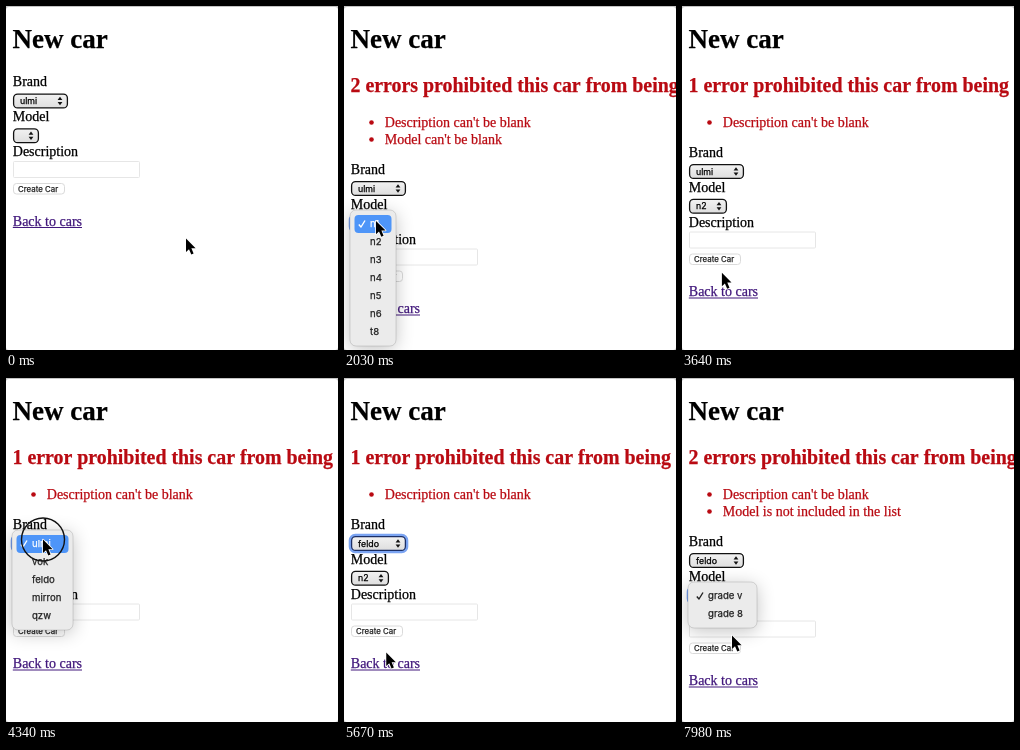
An HTML page with a canvas for the animation above (8000 ms loop, 332x344 px).

```html
<!DOCTYPE html>
<html lang="en">
<head>
<meta charset="utf-8">
<title>New car</title>
<style>
  html, body { margin: 0; width: 100%; height: 100%; overflow: hidden; background: #fff; }
  canvas { display: block; }
</style>
</head>
<body>
<canvas id="stage" width="332" height="344"></canvas>
<script>
const ctx = document.getElementById('stage').getContext('2d');
const LOOP = 8000, STEP = 70;
const SERIF = '"Liberation Serif", serif', SANS = 'Inter, sans-serif';
const RED = '#b90a12';

// Pointer tip: time, x, y
const path = [
  [0, 180, 232], [140, 191, 238], [630, 40, 183], [1330, 40, 183],
  [1610, 32, 212], [1960, 32, 212], [2310, 32, 234], [2520, 32, 234],
  [2870, 40, 303], [3080, 39.5, 260], [3220, 40, 269], [3570, 40, 270],
  [4200, 37, 161], [4480, 37, 161], [4760, 37, 208], [5110, 37, 208],
  [5600, 42, 276], [5950, 44.5, 257], [6580, 44.5, 257], [6860, 146, 136],
  [7140, 45, 216], [7630, 45, 216], [7960, 50, 257], [LOOP, 50, 257]
];
// Mouse button held: from, to
const presses = [[700, 840], [1680, 1820], [2310, 2450], [3220, 3430],
  [4270, 4480], [4830, 5040], [5950, 6090], [7210, 7350]];
const submits = [presses[0], presses[3], presses[6]];
const menus = [
  { open: 1680, pick: 2450, top: 204, width: 46, items: ['n1', 'n2', 'n3', 'n4', 'n5', 'n6', 't8'] },
  { open: 4270, pick: 5040, top: 152, width: 61, items: ['ulmi', 'vok', 'feldo', 'mirron', 'qzw'] },
  { open: 7210, pick: Infinity, top: 204, width: 69, items: ['grade v', 'grade 8'] }
];
const pages = [
  { from: 0, shift: 0, title: '', errors: [] },
  { from: 910, shift: 87.5, title: '2 errors prohibited this car from being saved:',
    errors: ["Description can't be blank", "Model can't be blank"] },
  { from: 3430, shift: 70.5, title: '1 error prohibited this car from being saved:',
    errors: ["Description can't be blank"] },
  { from: 6160, shift: 87.5, title: '2 errors prohibited this car from being saved:',
    errors: ["Description can't be blank", 'Model is not included in the list'] }
];

const during = (t, spans) => spans.some(([a, b]) => t >= a && t < b);

// A hairline stroke gives the text its slightly heavy rendering.
function text(str, x, y, font, color = '#000') {
  ctx.font = font;
  ctx.fillStyle = ctx.strokeStyle = color;
  ctx.lineWidth = .25;
  ctx.lineJoin = 'round';
  ctx.fillText(str, x, y);
  ctx.strokeText(str, x, y);
}

function box(x, y, w, h, r, fill, stroke, line = 1) {
  ctx.beginPath();
  ctx.roundRect(x, y, w, h, r);
  if (fill) { ctx.fillStyle = fill; ctx.fill(); }
  if (stroke) { ctx.strokeStyle = stroke; ctx.lineWidth = line; ctx.stroke(); }
}

function polyline(points, color, width) {
  ctx.beginPath();
  points.forEach(([x, y]) => ctx.lineTo(x, y));
  ctx.strokeStyle = color;
  ctx.lineWidth = width;
  ctx.stroke();
}

function triangle(x, y, dir) {
  ctx.beginPath();
  ctx.moveTo(x - 2.4, y);
  ctx.lineTo(x + 2.4, y);
  ctx.lineTo(x, y + 3.2 * dir);
  ctx.fillStyle = '#111';
  ctx.fill();
}

function select(label, cy, width, focused) {
  if (focused) box(6.3, cy - 8.2, width + 1.4, 16.4, 5, null, '#7ba4f2', 3.2);
  const shade = ctx.createLinearGradient(0, cy - 7, 0, cy + 7);
  shade.addColorStop(0, '#f2f2f2');
  shade.addColorStop(1, '#dedede');
  box(7.6, cy - 6.9, width - 1.2, 13.8, 4, shade, focused ? '#1c2f66' : '#111', 1.3);
  text(label, 14, cy + 3, '8.8px ' + SANS);
  triangle(width - 1, cy - 1, -1);
  triangle(width - 1, cy + 1, 1);
}

function pageAt(t) {
  const { shift, title, errors } = pages.filter(p => p.from <= t).pop();
  const body = '14px ' + SERIF;
  text('New car', 6.5, 42, 'bold 27px ' + SERIF);
  text(title, 6.5, 85.5, 'bold 19.9px ' + SERIF, RED);
  errors.forEach((error, i) => {
    const y = 120.5 + 17 * i;
    ctx.beginPath();
    ctx.arc(27.5, y - 4, 2.3, 0, 7);
    ctx.fillStyle = RED;
    ctx.fill();
    text(error, 40.8, y, body, RED);
  });

  const model = t < 910 ? '' : t < 2450 ? 'n1' : t < 6160 ? 'n2' : 'grade v';
  const modelWidth = { 0: 26, 2: 38, 7: 63 }[model.length];
  ctx.save();
  ctx.translate(0, shift);
  text('Brand', 6.8, 80.4, body);
  select(t < 5040 ? 'ulmi' : 'feldo', 95, 55, t >= 4270 && t < 6160);
  text('Model', 6.8, 115.3, body);
  select(model, 129.8, modelWidth, t >= 1680 && t < 3430 || t >= 7210);
  text('Description', 6.8, 150.4, body);
  box(7.5, 155.5, 126, 16, 1, '#fff', '#e6e6e6');
  const held = during(t, submits);
  box(7.5, 177.5, 51, 10.5, 3, held ? '#4a90f6' : '#fff', held ? '#3a7be0' : '#dadada');
  text('Create Car', 12, 185.6, '7.9px ' + SANS, held ? '#fff' : '#222');
  text('Back to cars', 6.8, 219.5, body, '#42187c');
  ctx.fillRect(6.8, 221, 69.2, 1);
  ctx.restore();
}

function menu({ open, pick, top, width, items }, t, pointerY) {
  if (t < open || t >= pick + 210) return;
  const height = items.length * 18 + 10;
  const hover = t >= pick && t < pick + STEP ? -1 : Math.floor((pointerY - top - 5) / 18);
  ctx.save();
  ctx.globalAlpha = Math.min(1, (pick + 280 - t) / 210);
  ctx.save();
  ctx.shadowColor = 'rgba(0,0,0,.24)';
  ctx.shadowBlur = 18;
  ctx.shadowOffsetY = 3;
  box(6, top, width, height, 6, '#ebebeb');
  ctx.restore();
  box(6, top, width, height, 6, null, 'rgba(0,0,0,.16)', .8);
  items.forEach((item, i) => {
    const cy = top + 14 + i * 18, color = i === hover ? '#fff' : '#222';
    if (i === hover) box(10.5, cy - 9, width - 9, 18, 4, '#4e95f8');
    if (i === 0) polyline([[14.8, cy + .5], [17, cy + 3], [21, cy - 3.5]], color, 1.4);
    text(item, 26, cy + 3.3, '9.6px ' + SANS, color);
  });
  ctx.restore();
}

function pointerAt(t) {
  const i = path.findIndex(key => key[0] > t);
  const [t0, x0, y0] = path[i - 1], [t1, x1, y1] = path[i];
  const u = (t - t0) / (t1 - t0), e = u * u * (3 - 2 * u);
  return [x0 + (x1 - x0) * e, y0 + (y1 - y0) * e];
}

const arrow = new Path2D('M0 0V13.4L3 10.6L5.3 15.8L7.6 14.8L5.4 9.6H9.6Z');

function draw(now) {
  const t = Math.floor(now % LOOP / STEP) * STEP;
  const [x, y] = pointerAt(t);
  ctx.fillStyle = '#c4c4c4';
  ctx.fillRect(0, 0, 332, 344);
  box(0, 1, 332, 343, 3, '#fff');
  pageAt(t);
  menus.forEach(m => menu(m, t, y));
  if (during(t, presses)) {
    ctx.beginPath();
    ctx.arc(x, y + .5, 21.5, 0, 7);
    ctx.strokeStyle = '#111';
    ctx.lineWidth = 1.4;
    ctx.stroke();
  }
  ctx.save();
  ctx.translate(x, y + .6);
  ctx.lineJoin = 'round';
  ctx.strokeStyle = '#fff';
  ctx.lineWidth = 1.6;
  ctx.stroke(arrow);
  ctx.fillStyle = '#000';
  ctx.fill(arrow);
  ctx.restore();
}

const start = performance.now();
function tick() {
  draw(performance.now() - start);
  requestAnimationFrame(tick);
}
tick();
</script>
</body>
</html>
```
